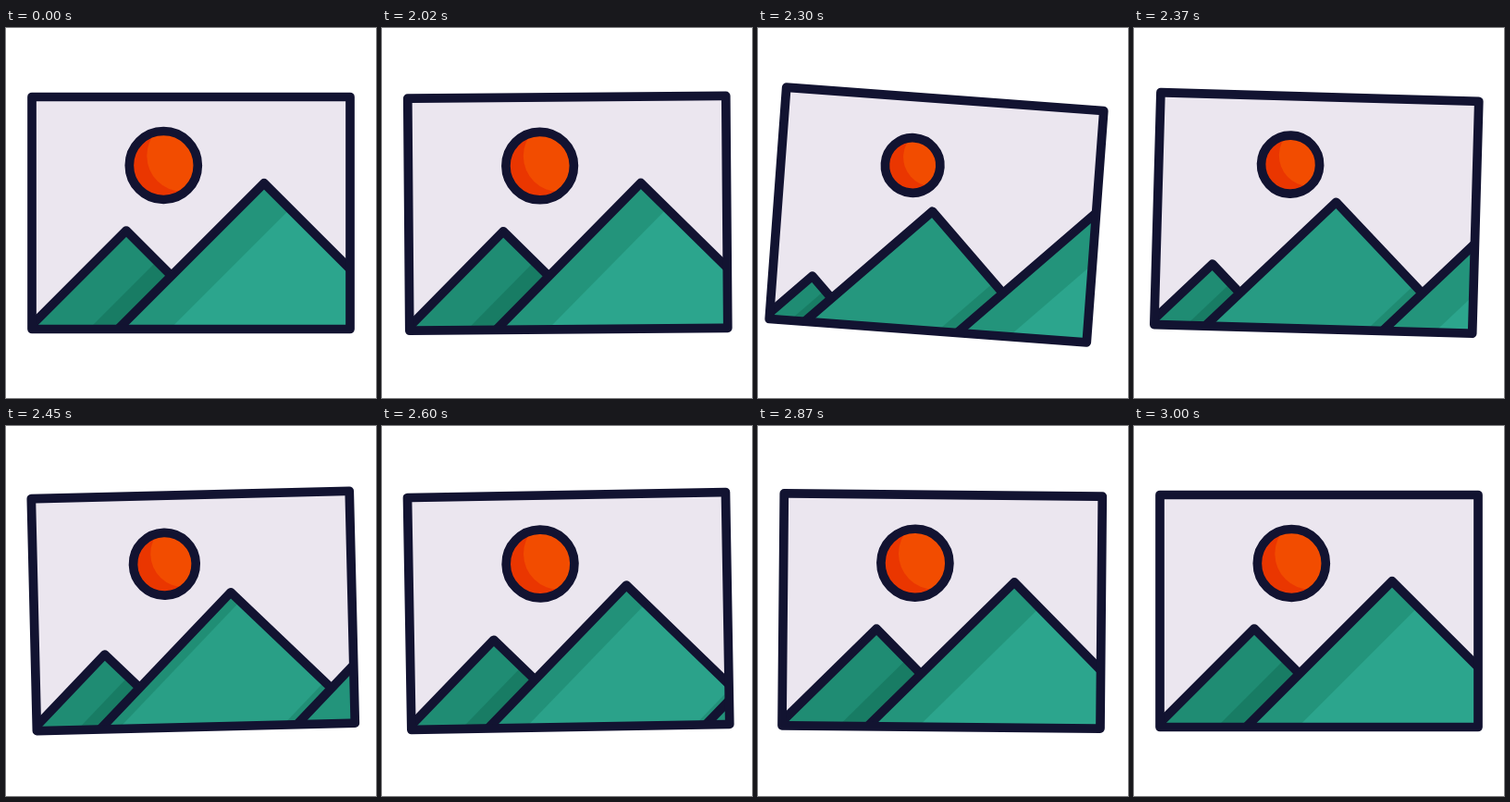
Animation, 400 px wide and 400 px high, one loop 3.02 s. Source, as an HTML page with a canvas:

```html
<!DOCTYPE html>
<html lang="en">
<head>
<meta charset="utf-8">
<title>Swinging picture</title>
<style>
html, body { margin: 0; width: 100%; height: 100%; overflow: hidden; background: #fff; }
canvas { display: block; width: 100vmin; height: 100vmin; }
</style>
</head>
<body>
<canvas width="400" height="400"></canvas>
<script>
const LOOP = 3020, REST = 2020, START = 2000, LENGTH = 1000;
const INK = '#121331', SKY = '#ebe6ef';
const FAR = { main: [31, 140, 115], shade: [24, 124, 100] };
const NEAR = { main: [44, 165, 141], shade: [35, 148, 123] };

// Key poses as [ms after START, value], eased in and out
const TILT = [[0, 0], [67, -2], [250, 5], [500, -2.1], [750, 1], [1000, 0]];
const DROP = [[0, 0], [200, 9.2], [350, 0]];
const SUN = [[0, 37], [200, 28.6], [630, 37]];

const canvas = document.querySelector('canvas');
const ctx = canvas.getContext('2d');

const lerp = (a, b, p) => a + (b - a) * p;
const smooth = x => x * x * (3 - 2 * x);
const mix = (a, b, p) => `rgb(${a.map((v, i) => Math.round(lerp(v, b[i], p)))})`;

function pose(keys, t) {
  const next = keys.findIndex(k => k[0] > t);
  if (next < 0) return keys[keys.length - 1][1];
  const [t0, a] = keys[next - 1], [t1, b] = keys[next];
  return lerp(a, b, smooth((t - t0) / (t1 - t0)));
}

// cubic-bezier(.38, 0, .15, 1)
function glide(x) {
  let lo = 0, hi = 1;
  for (let i = 0; i < 24; i++) {
    const s = (lo + hi) / 2, r = 1 - s;
    if (3 * s * r * r * 0.38 + 3 * s * s * r * 0.15 + s ** 3 < x) lo = s;
    else hi = s;
  }
  return smooth(hi);
}

function fill(path, color) {
  ctx.fillStyle = color;
  ctx.fill(path);
}

function disc(x, y, r) {
  const path = new Path2D();
  path.arc(x, y, r, 0, 7);
  return path;
}

function polygon(...points) {
  const path = new Path2D();
  points.forEach(([x, y]) => path.lineTo(x, y));
  path.closePath();
  return path;
}

// Lit strip lies between two diagonals, measured from the left slope
function mountain(x, y, from, to, p, a, b) {
  const h = 360 - y;
  const shape = polygon([x, y], [x + h, 360], [x - h, 360]);
  const top = y - 20, end = x + y - 360;
  fill(shape, mix(a.shade, b.shade, p));
  ctx.save();
  ctx.clip(shape);
  fill(polygon([x + from + 20, top], [x + to + 20, top], [end + to, 360], [end + from, 360]),
    mix(a.main, b.main, p));
  ctx.restore();
  ctx.stroke(shape);
}

function sun(r) {
  const x = 170.3, y = 148.5, body = disc(x, y, r);
  fill(body, '#ea3600');
  ctx.save();
  ctx.clip(body);
  fill(disc(x + 21, y - 10.5, r + 2), '#f24c00');
  ctx.restore();
  ctx.stroke(body);
}

function draw(t) {
  const p = glide(t / LENGTH);
  const scale = canvas.width / 400;
  ctx.setTransform(scale, 0, 0, scale, 0, 0);
  ctx.fillStyle = '#fff';
  ctx.fillRect(0, 0, 400, 400);
  ctx.lineWidth = 9.7;
  ctx.lineJoin = 'round';
  ctx.strokeStyle = INK;

  // The picture hangs from a point near its top
  ctx.translate(200, 105 + pose(DROP, t));
  ctx.rotate(pose(TILT, t) * Math.PI / 180);
  ctx.translate(-200, -105);

  const frame = polygon([28, 74.5], [372, 74.5], [372, 325.5], [28, 325.5]);
  fill(frame, SKY);
  ctx.save();
  ctx.clip(frame);
  sun(pose(SUN, t));
  mountain(lerp(25, 130, p), lerp(320, 219, p), -30, 66 * p, 0, FAR, FAR);
  mountain(lerp(130, 279, p), lerp(219, 167.7, p), 56 - 142 * (1 - p), lerp(66, 243, p), p, FAR, NEAR);
  mountain(lerp(279, 531, p), 167.7, 56, 500, 0, NEAR, NEAR);
  ctx.restore();
  ctx.stroke(frame);
}

function tick() {
  const now = performance.now() % LOOP;
  draw(now < REST ? 0 : Math.min(now - START, LENGTH));
  requestAnimationFrame(tick);
}
tick();
</script>
</body>
</html>
```
